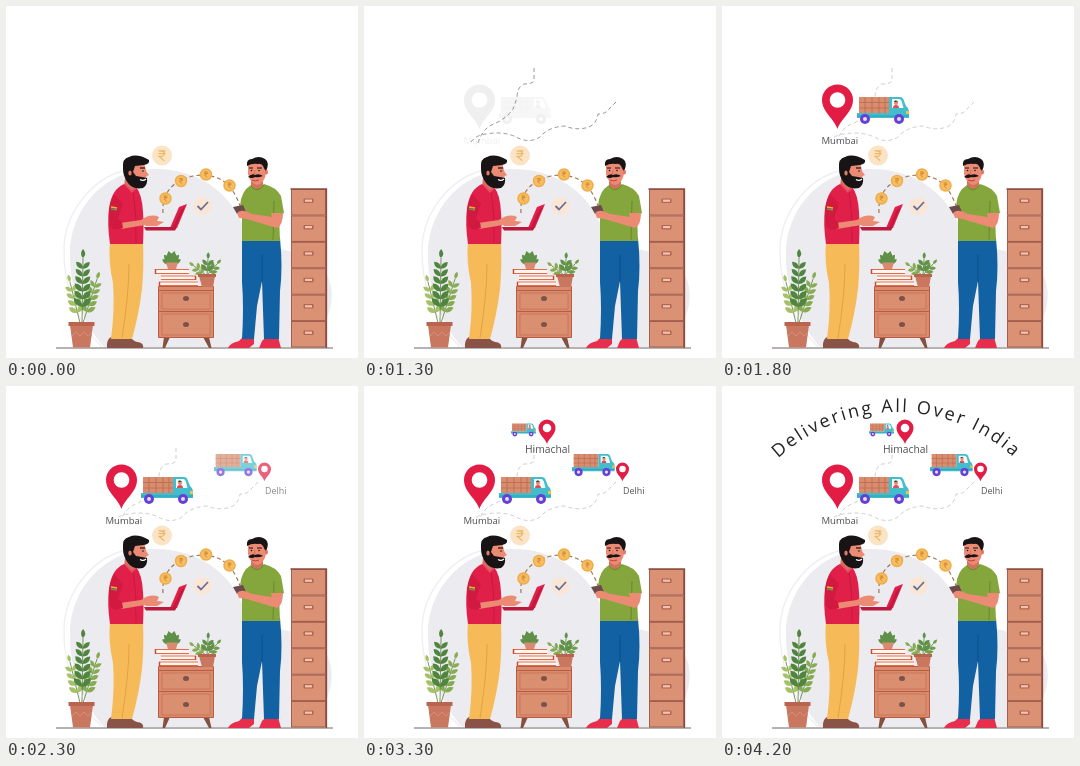
These frames come from a looping animation (352x352 px, 4.5 s). An HTML page:

```html
<!DOCTYPE html>
<html lang="en">
<head>
<meta charset="utf-8">
<title>Delivering all over India</title>
<style>
html, body { margin: 0; width: 100%; height: 100%; overflow: hidden; background: #fff; }
svg { position: absolute; left: 0; top: 0; width: 352px; height: 352px; }
text { font-family: "Open Sans", "Noto Sans", sans-serif; fill: #505054; }
.skin { fill: #ec8b74; }
.route, .mumbai, .delhi, .himachal, .title { animation: 4500ms infinite step-end; }
.route { animation-name: route; fill: none; stroke-width: .85; stroke-dasharray: 4 3; }
.mumbai { animation-name: mumbai; }
.delhi { animation-name: delhi; }
.himachal { animation-name: himachal; }
.title { animation-name: title; }

@keyframes route {
  0% { opacity: 0; stroke: #85858a; }
  28.88% { opacity: 1; stroke: #85858a; animation-timing-function: steps(5); }
  40%, 100% { opacity: 1; stroke: #c6c6ca; }
}
@keyframes mumbai {
  0% { opacity: 0; filter: grayscale(1); }
  28.88% { opacity: .09; filter: grayscale(1); animation-timing-function: steps(5); }
  40%, 100% { opacity: 1; filter: grayscale(0); }
}
@keyframes delhi {
  0% { opacity: 0; }
  42.22% { opacity: .09; animation-timing-function: steps(6); }
  55.55%, 100% { opacity: 1; }
}
@keyframes himachal {
  0% { opacity: 0; }
  62.22% { opacity: .09; animation-timing-function: steps(5); }
  73.33%, 100% { opacity: 1; }
}
/* The headline opens outwards from its middle. */
@keyframes title {
  0% { clip-path: inset(0 177.5px 0 174.5px); }
  75.55% { clip-path: inset(0 163.3px 0 160.3px); animation-timing-function: steps(8); }
  93.33%, 100% { clip-path: inset(0 49.5px 0 46.5px); }
}
</style>
</head>
<body>
<svg viewBox="0 0 352 352">
  <defs>
    <g id="pin">
      <path d="M0 28C-3 18-15.500 11-15.500-1A15.500 15.500 0 0 1 15.500-1C15.500 11 3 18 0 28Z" fill="#e31c45"/>
      <circle cy="-1" r="7.800" fill="#fff"/>
    </g>
    <g id="wheel">
      <circle r="5" fill="#6440d6"/>
      <circle r="2" fill="#e2dcfb"/>
    </g>
    <g id="truck">
      <path d="M0 16H32V0H43Q46 0 47 4L49 9Q52 11 52 14V21H0Z" fill="#43bccb"/>
      <path d="M2 0H32V16H2Z" fill="#d98d6e"/>
      <path d="M2 5.500H32M2 11H32M8 0V16M15 0V16M22 0V16M28 0V16" stroke="#b4694f" stroke-width=".7"/>
      <path d="M35 2H42.500Q44 2 45 5L46.500 11H35Z" fill="#f1fafc"/>
      <circle cx="39" cy="6" r="2" fill="#e08a70"/>
      <path d="M37 5Q38 2.500 41 4.500Z" fill="#222"/>
      <path d="M36 11Q36 8 39 8Q42 8 42 11Z" fill="#e14b55"/>
      <path d="M49 14H52V17H49Z" fill="#f5c04a"/>
      <path d="M0 19H52" stroke="#2ba0b8"/>
      <use href="#wheel" x="8" y="22"/>
      <use href="#wheel" x="42" y="22"/>
    </g>
    <path id="rupee" d="M-3-4H3M-3-1.600H3M-2-4Q2-4 2-1.600Q2 .8-2.500 .8L2 4.600" fill="none"/>
    <g id="coin">
      <circle r="6.200" fill="#f0ac45"/>
      <circle r="4.800" fill="#f6bd64"/>
      <use href="#rupee" transform="scale(.62)" stroke="#d08a2c" stroke-width="1.300"/>
    </g>
    <g id="drawer">
      <rect width="35" height="26.600" fill="#a25e4e"/>
      <rect x="1" y="1" width="33" height="24.500" fill="#da9174"/>
      <rect x="12.500" y="9.500" width="10" height="4.500" rx="1" fill="#b46552"/>
      <rect x="14" y="10.600" width="7" height="2.200" fill="#f0c5b0"/>
    </g>
    <path id="arc" d="M34.500 96.700A174 174 0 0 1 314.500 96.700"/>
  </defs>

  <!-- backdrop -->
  <path d="M96 341C72 318 57 280 58 242C59 207 86 171 121 164" fill="none" stroke="#efeef1" stroke-width="1.300"/>
  <path d="M98 341C75 315 63 280 64 245C66 201 99 163 149 163C193 163 222 187 235 215C248 245 281 240 305 253C329 267 331 296 317 320L307 341Z" fill="#ecebef"/>
  <path d="M50 342H327" stroke="#6f6666"/>

  <!-- tall cabinet -->
  <g id="cabinet"></g>
  <path d="M284.500 183H320.500V342" fill="none" stroke="#8a4c40" stroke-width="1.300"/>

  <!-- floor plant -->
  <g id="floorPlant"></g>
  <path d="M64 319H87L84 341.500H67Z" fill="#c9775f"/>
  <path d="M62.500 316H88.500V320H62.500Z" fill="#b9644f"/>
  <path d="M66 330L70 326 74 330 78 326 82 330 86 326" fill="none" stroke="#d99580" stroke-width=".8"/>

  <!-- bedside chest -->
  <path d="M158 331H164L159 342H156.500ZM197 331H203L205.500 342H203Z" fill="#84503f"/>
  <path d="M152.500 280.500H207.500V331.500H152.500Z" fill="#d98c6c" stroke="#bb5a45"/>
  <path d="M153 284.500H207M153 305.500H207" stroke="#bb5a45" stroke-width="1.200"/>
  <path d="M156 287H204V303H156ZM156 308H204V329H156Z" fill="#da9070" stroke="#c46a52" stroke-width=".7"/>
  <ellipse cx="180" cy="292.500" rx="3" ry="2.500" fill="#7c5149"/>
  <ellipse cx="180" cy="318.500" rx="3" ry="2.500" fill="#7c5149"/>

  <!-- books and small plants -->
  <path d="M149 263H183V268H149ZM155 269H190V274H155ZM154 275H192V280H154Z" fill="#fdf8f3"/>
  <path d="M149 263.500H183M150 267.500H183M155 270H190M155 273.500H190M153 276H192M153 279.500H192" stroke="#ea6a45" stroke-width="1.200"/>
  <path d="M149.500 263V268M189.500 270V274M153.500 276V280" stroke="#c94b35" stroke-width="1.500"/>
  <g id="smallPlants"></g>
  <path d="M160 256.500H172L170 263H162Z" fill="#d98a72"/>
  <path d="M193 270H209L207 281H196Z" fill="#c9775f"/>
  <path d="M192 268H210V271H192Z" fill="#b9644f"/>

  <!-- seller -->
  <path d="M101 342Q100 334 105 331H114Q118 336 124 338 126 340 125 342ZM114 342V331H124Q128 336 134 336.500 138 338 137 342Z" fill="#8a5347"/>
  <path d="M104 235H137Q138 262 136 283Q133 308 126 333H105Q109 302 107 277Q102 255 104 235Z" fill="#f7ba58"/>
  <path d="M123 258Q123 288 116 332" fill="none" stroke="#dfa040" stroke-width=".9"/>
  <path d="M119 172H131V183L125 187 118 181Z" fill="#d5705c"/>
  <path d="M118 178Q106 183 103 202Q101 218 104 238H137Q138 220 137 206Q136 188 130 181L126 185Z" fill="#e02049"/>
  <path d="M127 184Q131 210 130 237" fill="none" stroke="#bd193e" stroke-width=".8"/>
  <path d="M119 178L126 186 131 181" fill="none" stroke="#f04a69" stroke-width="1.500"/>
  <path class="skin" d="M120 156Q126 151 138 156L141 168Q140 178 131 180Q121 177 119 168ZM139 164L143 169 139 171Z"/>
  <path d="M117 163Q116 152 123 151Q131 147 143 154Q144 158 138 159L129 160 127 166 130 170 136 171 141 172Q142 179 137 182Q127 184 122 177Q117 170 117 163Z" fill="#181315"/>
  <path d="M134 173.500Q137 175.500 140 173" fill="none" stroke="#fff" stroke-width="1.300"/>
  <path d="M134 162H139" stroke="#181315" stroke-width="1.200"/>
  <circle cx="137" cy="165" r=".8" fill="#181315"/>
  <ellipse cx="124" cy="167" rx="1.700" ry="2.500" fill="#dd7a65"/>
  <path class="skin" d="M114 217L135 214Q145 207 153 211L151 215 139 219 115 223Z"/>
  <path d="M108 188Q101 201 104 220Q108 226 117 222L116 216 112 213 117 198" fill="#d21a40"/>
  <path d="M105 201L111 202" stroke="#f2b13c" stroke-width="1.300"/>
  <path d="M105 203L111 204" stroke="#5d9b4a" stroke-width="1.300"/>
  <path d="M164 222L173 201 181 198 171 222Z" fill="#e02049"/>
  <path d="M167 221L175 204 179 201 170 221Z" fill="#c3183f"/>
  <path d="M138 221H171L169 224.500H140Z" fill="#bd193e"/>
  <path class="skin" d="M138 218Q147 213 158 216L151 220H140Z"/>

  <!-- buyer -->
  <path d="M222 342Q224 337 233 335L237 331H248V338L243 342ZM253 342 256 335 260 331H272L275 342Z" fill="#e72e4c"/>
  <path d="M236 232H274Q277 262 274 285L273 333H258L256 275 251 300 248 333H236Q238 302 236 276Z" fill="#1262a3"/>
  <path d="M256 249V276" stroke="#0d4c85" stroke-width=".9"/>
  <path d="M245 171H257V184L251 188 245 183Z" fill="#d5705c"/>
  <path d="M245 179L251 184 258 178Q270 181 275 190L278 207 273 210 274 235H236V210L234 200Q235 185 245 179Z" fill="#85a63d"/>
  <path d="M245 180Q251 188 258 179M268 195L267 234" fill="none" stroke="#69892c"/>
  <path class="skin" d="M242 156Q251 152 260 156L260 168Q258 178 251 179Q244 177 242 168Z"/>
  <path d="M241 160Q240 153 246 153Q253 149 259 153Q264 156 260 166L257 160Q255 157 252 158Q246 157 241 160Z" fill="#181315"/>
  <path d="M242 171Q246 167 249 169Q253 167 257 170Q252 172 249 171Q246 173 242 171Z" fill="#181315"/>
  <path d="M246 174Q249 176 253 174" fill="none" stroke="#b8413f"/>
  <path d="M243 162H247M251 162H256" stroke="#181315"/>
  <circle cx="245.500" cy="164.500" r=".8" fill="#181315"/>
  <circle cx="253" cy="164.500" r=".8" fill="#181315"/>
  <path d="M249 164L248 168 250 168" fill="none" stroke="#cf6f59" stroke-width=".8"/>
  <ellipse cx="260.500" cy="166" rx="1.500" ry="2.500" fill="#dd7a65"/>
  <path class="skin" d="M265 207H277Q277 219 271 222L244 214 235 211 237 204 246 208 266 211Z"/>
  <path d="M227 201L237 199 240 206 231 208Z" fill="#6b4a4c"/>
  <path class="skin" d="M231 207Q235 203 241 206L242 213 233 212Z"/>

  <!-- payment -->
  <path d="M157 207Q155 178 187 170Q222 164 234 200" fill="none" stroke="#a0745a" stroke-width="1.200" stroke-dasharray="4 3"/>
  <use href="#coin" x="159.500" y="192.500"/>
  <use href="#coin" x="175" y="175"/>
  <use href="#coin" x="200" y="168.500"/>
  <use href="#coin" x="223.500" y="179.500"/>
  <circle cx="156" cy="149.500" r="10" fill="#fbe4c6"/>
  <use href="#rupee" transform="translate(156 149.500) scale(1.150)" stroke="#ebb765" stroke-width="1"/>
  <circle cx="196.500" cy="200" r="9" fill="#fbe6d5"/>
  <path d="M191.500 200L195 203.500 202 196" fill="none" stroke="#65709a" stroke-width="1.800"/>

  <!-- deliveries -->
  <path class="route" d="M170 62V75Q168 78 160 78Q153 81 153 92L149 103Q143 112 130 118Q118 122 113 140M107 136Q112 129 122 128Q140 125 152 131Q165 138 176 131Q184 121 201 120Q213 125 225 121Q233 117 234 108Q242 108 245 103L252 96"/>
  <g class="mumbai">
    <use href="#pin" x="115.500" y="95"/>
    <use href="#truck" x="135" y="91"/>
    <text x="99.500" y="138" font-size="9.500">Mumbai</text>
  </g>
  <g class="delhi">
    <use href="#pin" transform="translate(258.500 83.500) scale(.42)"/>
    <use href="#truck" transform="translate(208 68) scale(.82)"/>
    <text x="259" y="108" font-size="8.900">Delhi</text>
  </g>
  <g class="himachal">
    <use href="#pin" transform="translate(183 42.500) scale(.55)"/>
    <use href="#truck" transform="translate(147 37.500) scale(.48)"/>
    <text x="161" y="67" font-size="10.300">Himachal</text>
  </g>
</svg>
<svg class="title" viewBox="0 0 352 352">
  <text font-size="18" letter-spacing="2.350" text-anchor="middle" style="fill:#222225"><textPath href="#arc" startOffset="50%">Delivering All Over India</textPath></text>
</svg>
<script>
const add = (id, markup) => { document.getElementById(id).innerHTML += markup; };

const leaf = (x, y, angle, len, fill) =>
  `<path transform="translate(${x} ${y}) rotate(${angle})" fill="${fill}"
    d="M0 0Q${len * .5} ${-len * .48} ${len} 0Q${len * .5} ${len * .48} 0 0"/>`;

// A straight stem with paired leaves and one at the tip.
function sprig(id, x0, y0, x1, y1, pairs, len, fill) {
  const lean = Math.atan2(y1 - y0, x1 - x0) * 180 / Math.PI;
  let out = `<path d="M${x0} ${y0}L${x1} ${y1}" stroke="#5d7d3c" stroke-width=".8"/>`;
  for (let i = 0; i < pairs; i++) {
    const t = .25 + .7 * i / pairs;
    const x = x0 + (x1 - x0) * t, y = y0 + (y1 - y0) * t;
    const size = len * (1.1 - .35 * t);
    out += leaf(x, y, lean - 45, size, fill) + leaf(x, y, lean + 45, size, fill);
  }
  add(id, out + leaf(x1, y1, lean, len * .75, fill));
}

// Bare blades spreading from one root.
function fan(id, x, y, count, len, fill) {
  for (let i = 0; i < count; i++) {
    const side = i / (count - 1) - .5;
    add(id, leaf(x, y, -90 + side * 130, len * (1 - Math.abs(side) * .5), fill));
  }
}

for (let i = 0; i < 6; i++) add("cabinet", `<use href="#drawer" x="285" y="${183 + i * 26.4}"/>`);

sprig("floorPlant", 74, 317, 64, 276, 4, 10, "#a6c268");
sprig("floorPlant", 77, 317, 91, 273, 5, 10, "#86ac51");
sprig("floorPlant", 76, 317, 77, 252, 6, 12, "#4f8540");

fan("smallPlants", 165.5, 258, 6, 14, "#5f9148");
sprig("smallPlants", 200, 269, 188, 260, 2, 8, "#86ac51");
sprig("smallPlants", 201, 269, 211, 258, 2, 8, "#6f9d48");
sprig("smallPlants", 201, 269, 202, 253, 2, 9, "#5f9148");
</script>
</body>
</html>
```
